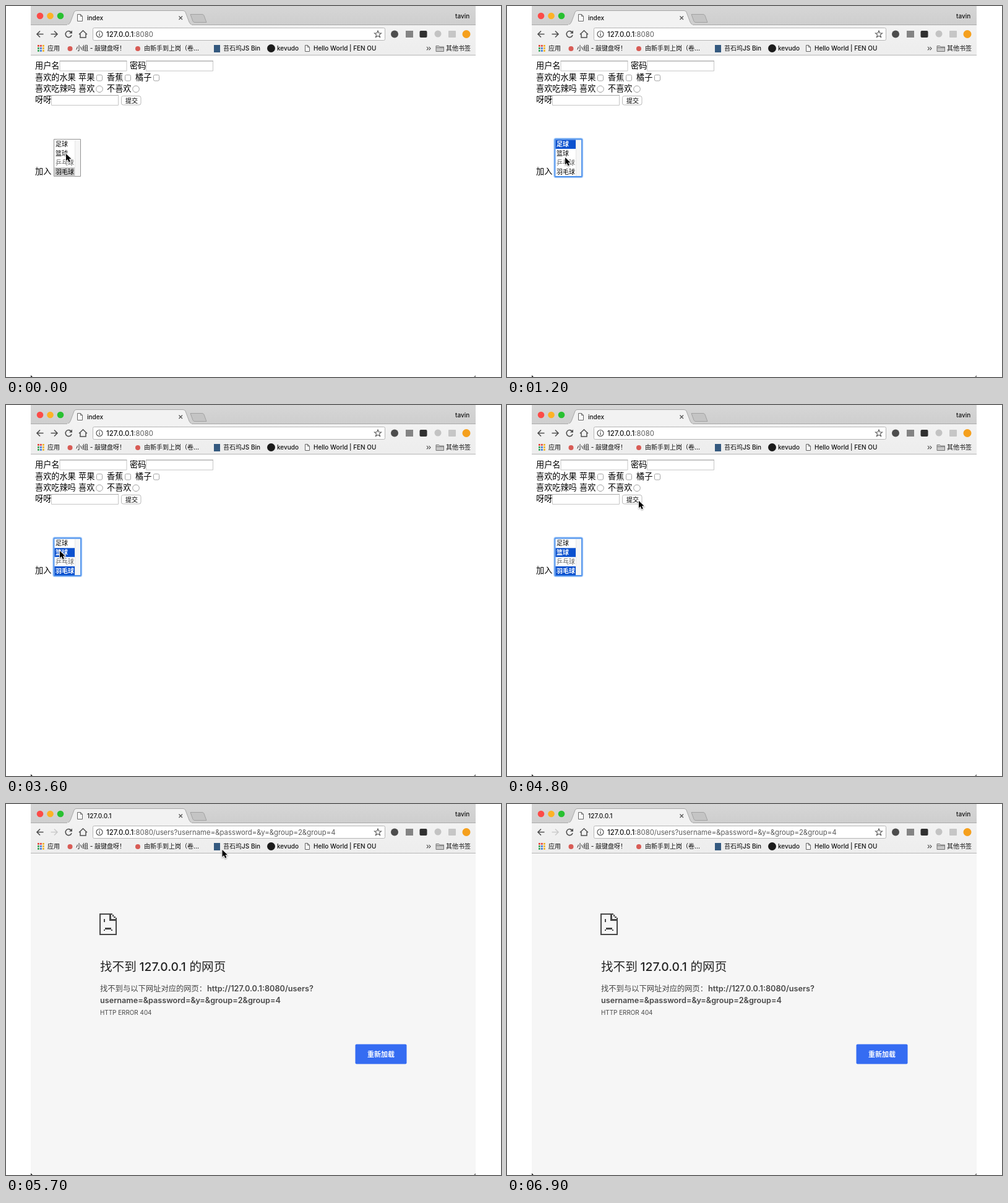
An HTML page with a canvas that plays this animation: 800 by 600 pixels, repeating every 7.2 s.

```html
<!DOCTYPE html>
<html lang="zh">
<head>
<meta charset="utf-8">
<style>
  html, body { margin: 0; width: 100%; height: 100%; overflow: hidden; background: #fff; }
  canvas { display: block; }
</style>
</head>
<body>
<canvas id="stage" width="800" height="600"></canvas>
<script>
const ctx = document.getElementById('stage').getContext('2d');
const FONT = 'Inter, "Noto Sans CJK SC", "Noto Sans CJK", sans-serif';
const LOOP = 7200, STEP = 300;
const ERROR_STEP = 17, FOCUS_STEP = 4;

// Pointer tip at each step; it is hidden once the list ends.
const pointerPath = [
  [97, 239], [69, 258], [90, 250], [96, 206], [94, 245], [94, 246], [94, 248], [95, 268],
  [95, 268], [95, 268], [95, 268], [87, 236], [87, 236], [87, 236], [382, 291], [370, 303],
  [213, 155], [213, 155], [300, 105], [349.5, 74]
];
const options = ['足球', '篮球', '乒乓球', '羽毛球'];
const QUERY = 'username=&password=&y=&group=2&group=4';

// Text is placed by its left edge and vertical centre; returns its width.
function text(str, x, cy, size, color = '#000', weight = 400) {
  ctx.font = `${weight} ${size}px ${FONT}`;
  ctx.fillStyle = color;
  ctx.fillText(str, x, cy + size * 0.37);
  return ctx.measureText(str).width;
}

function rect(x, y, w, h, fill) {
  ctx.fillStyle = fill;
  ctx.fillRect(x, y, w, h);
}

function paint(fill, stroke, width = 1) {
  if (fill) { ctx.fillStyle = fill; ctx.fill(); }
  if (stroke) { ctx.strokeStyle = stroke; ctx.lineWidth = width; ctx.stroke(); }
}

function box(x, y, w, h, r, fill, stroke, width) {
  ctx.beginPath();
  ctx.roundRect(x, y, w, h, r);
  paint(fill, stroke, width);
}

function disc(x, y, r, fill, stroke, width) {
  ctx.beginPath();
  ctx.arc(x, y, r, 0, Math.PI * 2);
  paint(fill, stroke, width);
}

function shape(d, fill, stroke, width, x = 0, y = 0) {
  ctx.save();
  ctx.translate(x, y);
  const path = new Path2D(d);
  if (fill) { ctx.fillStyle = fill; ctx.fill(path); }
  if (stroke) { ctx.strokeStyle = stroke; ctx.lineWidth = width || 1; ctx.stroke(path); }
  ctx.restore();
}

function gradient(y0, y1, from, to) {
  const g = ctx.createLinearGradient(0, y0, 0, y1);
  g.addColorStop(0, from);
  g.addColorStop(1, to);
  return g;
}

function pageIcon(x, y, w, h) {
  shape(`M.5 .5H${w - 3.5}L${w - .5} 3.5V${h - .5}H.5ZM${w - 3.5} .5V3.5H${w - .5}`,
    '#fafafa', '#666', 1, x, y);
}

function drawTabs(title) {
  rect(40, 0, 719, 31, gradient(0, 31, '#d6d6d6', '#cecece'));
  rect(40, 30, 719, 1, '#aaa');
  [['#fc4b48', 55], ['#fdb225', 71.5], ['#28c131', 88]].forEach(([c, x]) => disc(x, 16, 5.3, c));
  shape('M98 31C102 30 103 28 104.500 25L110 10Q111 7.500 114 7.500H286Q289 7.500 290 10L296 26Q298 30 301 31Z',
    '#f2f2f2', '#a8a8a8');
  rect(99, 30, 201, 2, '#f2f2f2');
  shape('M298 13.500H317Q319 13.500 320 15.500L324 26.500H305Q303 26.500 302 24.500Z', '#c4c4c4', '#a2a2a2');
  pageIcon(115, 13, 9, 12);
  text(title, 131, 19, 10.1, '#111', 500);
  shape('M279.500 16.500L285 22M285 16.500L279.500 22', null, '#555', 1.3);
  text('tavin', 726, 16.500, 10, '#111', 500);
}

function drawToolbar(failed) {
  rect(40, 31, 719, 49, gradient(31, 79, '#f2f2f2', '#ededed'));
  rect(40, 79, 719, 1, '#b6b6b6');
  const dark = '#505050';
  shape('M60.500 45.500H50.500M55 40.500L50 45.500L55 50.500', null, dark, 1.6);
  shape('M72.500 45.500H82.500M78 40.500L83 45.500L78 50.500', null, failed ? '#cbcbcb' : dark, 1.6);
  shape('M105.500 43A5 5 0 1 0 106 47', null, dark, 1.6);
  shape('M107 39.500V44.500H102Z', dark);
  shape('M118 46L124.500 39.800L131 46M120 45V51H129V45', null, dark, 1.5);

  box(140.5, 35.5, 472, 20, 2, '#fff', '#b5b5b5');
  disc(151, 45.500, 5, null, '#555', 1.2);
  rect(150.400, 44.500, 1.300, 4, '#555');
  rect(150.400, 42.300, 1.300, 1.300, '#555');
  const w = text('127.0.0.1', 162, 45.500, 11.35, '#151515', 500);
  text(':8080' + (failed ? '/users?' + QUERY : ''), 162 + w, 45.500, 11.35, '#5c5c5c');
  shape('M601 40L602.500 43.800L606.500 44L603.400 46.600L604.500 50.500L601 48.300L597.500 50.500L598.600 46.600L595.500 44L599.500 43.800Z',
    null, '#555', 1.1);

  disc(628, 45.500, 6, '#4d4d4d');
  rect(646, 40, 12, 11, '#848484');
  box(668.500, 40, 12, 11, 2, '#303030');
  disc(698, 45, 5.500, '#c3c3c3');
  box(715, 40, 12, 11, 1, '#c6c6c6');
  disc(744, 45.500, 6.500, '#f5a01d');
}

function drawBookmarks() {
  const cy = 68.5;
  const label = (str, x) => text(str, x, cy, 10, '#111', 500);
  const tiles = ['#e4443a', '#e4443a', '#f0b429', '#33a457', '#3c78d8', '#f0b429', '#33a457', '#3c78d8', '#f0b429'];
  tiles.forEach((c, i) => rect(51 + i % 3 * 4, 63 + Math.floor(i / 3) * 4, 2.8, 2.8, c));
  label('应用', 67);
  disc(103.500, 69, 4, '#d85b55');
  label('小组 - 敲键盘呀！', 113);
  disc(213, 69, 4, '#d85b55');
  label('由新手到上岗（卷...', 223);
  rect(336, 63, 10, 12, '#34597f');
  label('苔石坞JS Bin', 351);
  disc(428.500, 68.500, 6.500, '#1b1b1b');
  label('kevudo', 438);
  pageIcon(483, 63, 8, 11);
  label('Hello World | FEN OU', 497);
  shape('M680 66L682.500 68.700L680 71.400M683.500 66L686 68.700L683.500 71.400', null, '#444', 1.1);
  shape('M695 73.500V64.500H699.500L701 66H707.500V73.500ZM695 67.500H707.500', '#c9c9c9', '#777');
  label('其他书签', 711);
}

function field(x, y) {
  box(x + .5, y + .5, 108, 16, 0, '#fff', '#c6c6c6');
  rect(x, y, 109, 1, '#a9a9a9');
}

function drawSelect(step) {
  const focused = step >= FOCUS_STEP;
  const picked = step < 4 ? [3] : step < 7 ? [0] : step < 11 ? [3] : [1, 3];
  if (focused) {
    box(77, 215, 44.500, 61.500, 2, null, '#a9cdfa', 3.5);
    box(77.500, 215.500, 43.500, 60.500, 1, '#fff', '#4f92ec', 1.8);
  } else {
    box(77.5, 215.5, 43, 60, 0, '#fff', '#929292');
  }
  rect(111, 217, 9, 58, '#f6f6f6');
  rect(111, 217, 1, 58, '#e6e6e6');
  options.forEach((name, i) => {
    const on = picked.includes(i);
    if (on) rect(78.500, 216.500 + i * 14.8, 32.500, 14.5, focused ? '#0b51cf' : '#c8c8c8');
    const color = on && focused ? '#fff' : i === 2 ? '#606060' : '#000';
    text(name, 80, 223.500 + i * 14.8, 10, color, on && focused ? 700 : 500);
  });
}

function drawForm(step) {
  rect(40, 80, 719, 520, '#fff');
  const label = (str, x, cy) => text(str, x, cy, 13.15);
  label('用户名', 47, 96);
  field(86.5, 88.5);
  label('密码', 200, 96);
  field(226, 88.5);

  label('喜欢的水果', 47, 115);
  [['苹果', 117], ['香蕉', 163], ['橘子', 209]].forEach(([name, x]) => {
    label(name, x, 115);
    box(x + 29.500, 111.500, 9, 9.5, 2, '#fff', '#a3a3a3');
  });

  label('喜欢吃辣吗', 47, 133);
  label('喜欢', 117, 133);
  label('不喜欢', 163, 133);
  [151, 210].forEach(x => disc(x, 134.300, 5.3, '#fff', '#a0a0a0'));

  label('呀呀', 47, 151.5);
  field(73, 144);
  box(186.5, 145.5, 31.500, 14.5, 3, '#fff', '#b8b8b8');
  text('提交', 193, 152.8, 10, '#000', 500);

  label('加入', 47, 267.5);
  drawSelect(step);
}

function drawSadPage(x, y) {
  const snap = n => Math.round(n * 2.33);
  const cells = [
    [0, 0, 9, 1], [0, 0, 1, 15], [0, 14, 12, 1], [11, 3, 1, 12],
    [7, 0, 1, 5], [7, 4, 5, 1], [9, 1, 1, 1], [10, 2, 1, 1],
    [3, 4, 1, 2], [4, 10, 4, 1], [3, 11, 1, 1], [8, 11, 1, 1]
  ];
  cells.forEach(([cx, cy, w, h]) => {
    const left = snap(cx), top = snap(cy);
    rect(x + left, y + top, snap(cx + w) - left, snap(cy + h) - top, '#484848');
  });
}

function drawError() {
  rect(40, 80, 719, 520, '#f6f6f6');
  drawSadPage(151, 177);
  text('找不到', 152, 263, 19.6, '#222');
  text('127.0.0.1', 215.5, 263, 19.3, '#222', 500);
  text('的网页', 296.5, 263, 19.6, '#222');
  text('找不到与以下网址对应的网页：', 152, 298, 12.3, '#444');
  text('http://127.0.0.1:8080/users?', 325, 298, 12.7, '#484848', 600);
  text(QUERY, 152, 317.5, 12.65, '#484848', 600);
  text('HTTP ERROR 404', 152, 337, 9.9, '#484848');
  box(564.5, 388.5, 83, 32, 2, '#356cf2');
  text('重新加载', 584, 405, 11, '#fff', 700);
}

function drawCorners() {
  shape('M40 597L43 600H40Z', '#222');
  shape('M759 597L756 600H759Z', '#777');
}

function drawPointer([x, y]) {
  ctx.save();
  ctx.shadowColor = 'rgba(0,0,0,.3)';
  ctx.shadowBlur = 2;
  ctx.shadowOffsetY = 1;
  const arrow = 'M0 0V11.500L2.700 9L4.700 13.500L6.800 12.600L4.900 8.300H8.500Z';
  shape(arrow, '#fff', '#fff', 1.8, x, y);
  ctx.restore();
  shape(arrow, '#000', null, 0, x, y);
}

function draw(time) {
  const step = Math.floor(time % LOOP / STEP);
  const failed = step >= ERROR_STEP;
  rect(0, 0, 800, 600, '#fff');
  drawTabs(failed ? '127.0.0.1' : 'index');
  drawToolbar(failed);
  drawBookmarks();
  if (failed) drawError();
  else drawForm(step);
  drawCorners();
  if (pointerPath[step]) drawPointer(pointerPath[step]);
}

const start = performance.now();
function tick() {
  draw(performance.now() - start);
  requestAnimationFrame(tick);
}
tick();
</script>
</body>
</html>
```
